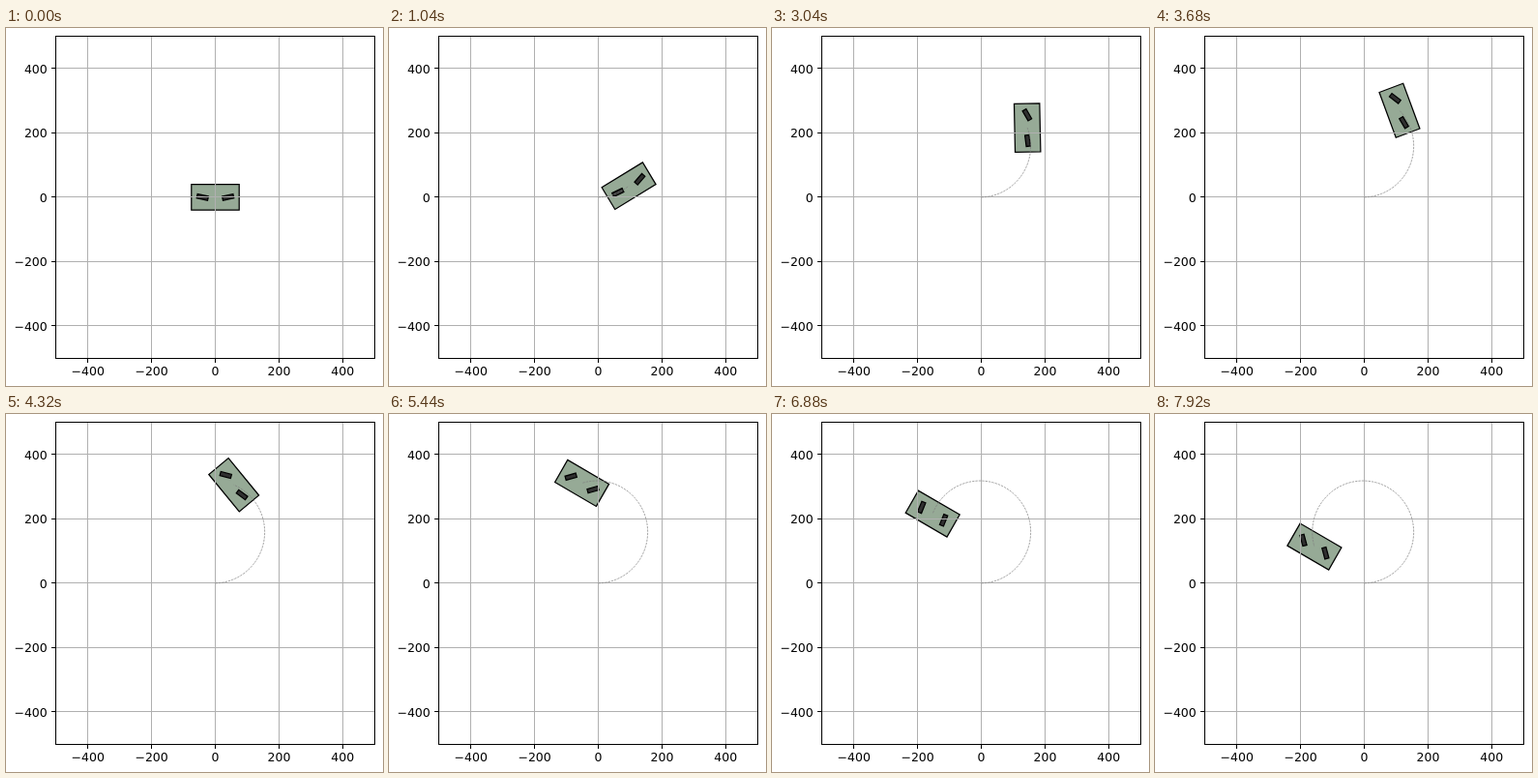
An HTML page with a canvas for the animation above (8 s loop, 390 px wide and 370 px high).

```html
<!DOCTYPE html>
<html lang="en">
<head>
<meta charset="utf-8">
<title>Four-wheel steering on a circle</title>
<style>
html, body { margin: 0; width: 100%; height: 100%; overflow: hidden; background: #fff; }
canvas { display: block; }
</style>
</head>
<body>
<canvas id="plot" width="390" height="370"></canvas>
<script>
const ctx = document.getElementById('plot').getContext('2d');
const RAD = Math.PI / 180;
const STEP = 80, STEPS = 100;
const SPEED = 100, COURSE_RATE = 36 * RAD, TURN_RATE = 30 * RAD, TURN_END = 5;
const ARM = 40;
const TICKS = [-400, -200, 0, 200, 400];

const X = x => 216.5 + x * 0.3295;
const Y = y => 174.9 - y * 0.3326;
const snap = v => Math.floor(v) + 0.5;

function line(x1, y1, x2, y2, color) {
  ctx.strokeStyle = color;
  ctx.lineWidth = 1;
  ctx.beginPath();
  ctx.moveTo(x1, y1);
  ctx.lineTo(x2, y2);
  ctx.stroke();
}

// Rectangle centred on (x, y) in plot units
function box(x, y, length, width, angle, fill) {
  const c = Math.cos(angle), s = Math.sin(angle);
  ctx.beginPath();
  for (const [i, j] of [[1, 1], [-1, 1], [-1, -1], [1, -1]]) {
    const u = i * length / 2, v = j * width / 2;
    ctx.lineTo(X(x + u * c - v * s), Y(y + u * s + v * c));
  }
  ctx.closePath();
  ctx.fillStyle = fill;
  ctx.fill();
  ctx.strokeStyle = '#000';
  ctx.lineWidth = 1.25;
  ctx.stroke();
}

// Position after n steps of constant speed and constant course change
function position(n) {
  const turn = COURSE_RATE * STEP / 1000, half = turn / 2;
  const r = SPEED * STEP / 2000 / Math.sin(half);
  const a = n * turn + half;
  return [r * (Math.sin(a) - Math.sin(half)), r * (Math.cos(half) - Math.cos(a))];
}

function drawCar(n) {
  const t = n * STEP / 1000;
  const [x, y] = position(n);
  const heading = TURN_RATE * Math.min(t, TURN_END);
  const spin = t < TURN_END ? TURN_RATE : 0;
  const course = COURSE_RATE * t;
  const c = Math.cos(heading), s = Math.sin(heading);
  box(x, y, 150, 80, heading, '#96aa96');
  for (const arm of [ARM, -ARM]) {
    // Each wheel points along its own velocity
    const vx = SPEED * Math.cos(course) - spin * arm * s;
    const vy = SPEED * Math.sin(course) + spin * arm * c;
    box(x + arm * c, y + arm * s, 35, 13, Math.atan2(vy, vx), '#303030');
  }
}

function drawGrid() {
  for (const v of TICKS) {
    line(snap(X(v)), Y(500), snap(X(v)), Y(-500), '#b0b0b0');
    line(X(-500), snap(Y(v)), X(500), snap(Y(v)), '#b0b0b0');
  }
}

function drawTrail(n) {
  ctx.strokeStyle = '#808080';
  ctx.lineWidth = 0.7;
  ctx.setLineDash([2.4, 1]);
  ctx.beginPath();
  for (let i = 0; i <= n; i++) {
    const [x, y] = position(i);
    ctx.lineTo(X(x), Y(y));
  }
  ctx.stroke();
  ctx.setLineDash([]);
}

function drawAxes() {
  const left = snap(X(-500)), right = snap(X(500));
  const top = snap(Y(500)), bottom = snap(Y(-500));
  ctx.strokeStyle = '#000';
  ctx.lineWidth = 1;
  ctx.strokeRect(left, top, right - left, bottom - top);
  ctx.font = '12.5px "DejaVu Sans", sans-serif';
  ctx.fillStyle = '#000';
  for (const v of TICKS) {
    const label = String(v).replace('-', '\u2212');
    const x = snap(X(v)), y = snap(Y(v));
    line(x, bottom, x, bottom + 4.5, '#000');
    line(left - 4.5, y, left, y, '#000');
    ctx.textAlign = 'center';
    ctx.fillText(label, X(v), 359.2);
    ctx.textAlign = 'right';
    ctx.fillText(label, left - 8.75, Y(v) + 4.7);
  }
}

function draw(now) {
  const n = Math.floor(now / STEP) % STEPS;
  ctx.fillStyle = '#fff';
  ctx.fillRect(0, 0, 390, 370);
  drawCar(n);
  drawGrid();
  drawTrail(n);
  drawAxes();
}

let start;
function tick(now) {
  start ??= now;
  draw(now - start);
  requestAnimationFrame(tick);
}
draw(0);
requestAnimationFrame(tick);
</script>
</body>
</html>
```
